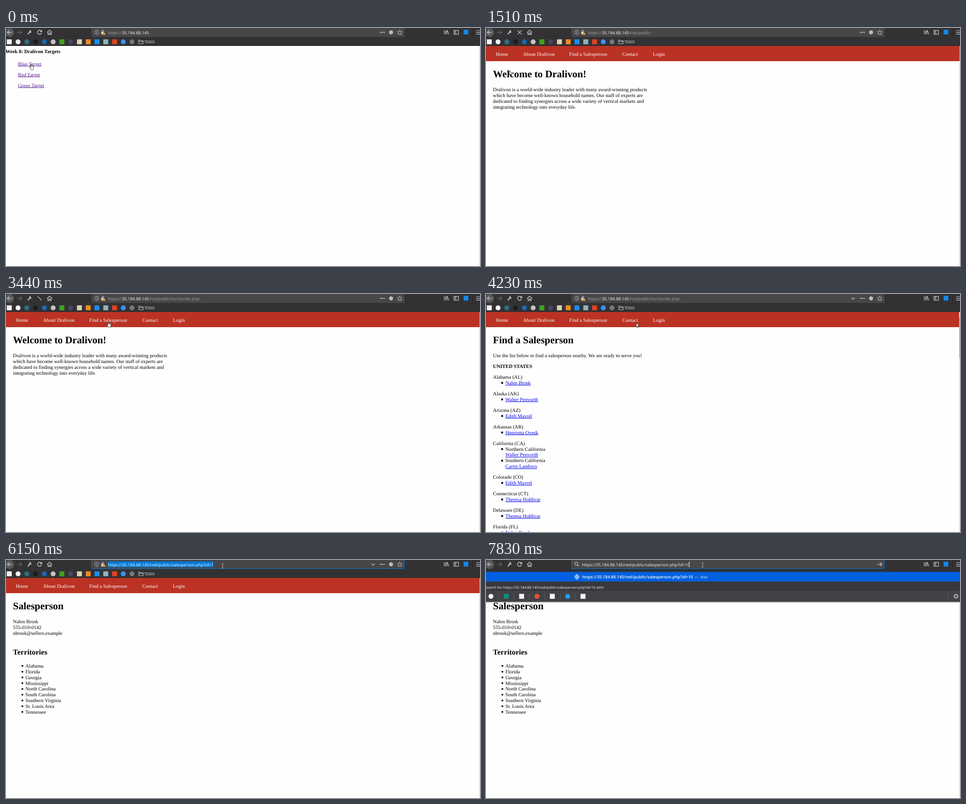
An HTML page that plays this animation: 1055x531 px, repeating every 8000 ms.

```html
<!DOCTYPE html>
<html lang="en">
<head>
<meta charset="utf-8">
<title>Browsing session</title>
<style>
  html, body { margin: 0; width: 100%; height: 100%; overflow: hidden; background: #fefefe; }
  svg { display: block; text-rendering: geometricPrecision; }
  .page { font: 11.16px "Liberation Serif", "Times New Roman", serif; }
  .ui { font: 9.2px "Open Sans", "Noto Sans", sans-serif; fill: #f9f9fa; }
  .link { text-decoration: underline; fill: #0000ee; }
  .visited { fill: #551a8b; }
  .bold { font-weight: bold; }
  .h1 { font-size: 22.25px; font-weight: bold; }
  .h2 { font-size: 16.7px; font-weight: bold; }
  .icon { fill: none; stroke: #d4d4d6; stroke-width: 1.2; }
</style>
</head>
<body>
<svg id="stage" width="1055" height="531" viewBox="0 0 1055 531"></svg>
<script>
const LOOP = 8000;
const LINE = 12.9;
const COMPANY = 'Dralivon';
const HOST = '35.184.88.145';
const PUBLIC = '/red/public/';
const AGENT = 'Nalen Brosk';

const text = (x, y, str, cls = '', extra = '') =>
  `<text x="${x}" y="${y}" class="${cls}" ${extra}>${str}</text>`;
const rect = (x, y, w, h, fill, extra = '') =>
  `<rect x="${x}" y="${y}" width="${w}" height="${h}" fill="${fill}" ${extra}/>`;
const disc = (x, y, r, fill) => `<circle cx="${x}" cy="${y}" r="${r}" fill="${fill}"/>`;
const icon = (d, extra = '') => `<path class="icon" d="${d}" ${extra}/>`;
const group = (id, content, cls = '') => `<g id="${id}" class="${cls}">${content}</g>`;

// Pages
function indexPage() {
  return text(-1, 56, `Week 8: ${COMPANY} Targets`, 'bold') +
    ['Blue', 'Red', 'Green'].map((name, i) =>
      text(26.8, 83.5 + 24 * i, name + ' Target', 'link visited', `id="link${name}"`)).join('');
}

function navBar() {
  const items = [[22, 'Home'], [82.5, 'About ' + COMPANY], [185.3, 'Find a Salesperson'],
    [303.3, 'Contact'], [371.5, 'Login']];
  return rect(0, 40, 1055, 34, '#bb3224') +
    items.map(([x, label]) => text(x, 62, label, '', 'fill="#fff"')).join('');
}

function homePage() {
  const lines = [
    `${COMPANY} is a world-wide industry leader with many award-winning products`,
    'which have become well-known household names. Our staff of experts are',
    'dedicated to finding synergies across a wide variety of vertical markets and',
    'integrating technology into everyday life.'];
  return text(15.6, 110.4, `Welcome to ${COMPANY}!`, 'h1') +
    lines.map((line, i) => text(15.6, 141 + LINE * i, line)).join('');
}

function territoriesPage() {
  const walter = 'Walter Penvorth', edith = 'Edith Mavrel', theresa = 'Theresa Holdivar';
  const states = [
    ['Alabama (AL)', AGENT], ['Alaska (AK)', walter], ['Arizona (AZ)', edith],
    ['Arkansas (AR)', 'Henrietta Ovesk'],
    ['California (CA)', walter, 'Northern California', 'Carrie Landovo', 'Southern California'],
    ['Colorado (CO)', edith], ['Connecticut (CT)', theresa], ['Delaware (DE)', theresa],
    ['Florida (FL)', AGENT]];
  let out = text(15.6, 110.4, 'Find a Salesperson', 'h1') +
    text(15.6, 141, 'Use the list below to find a salesperson nearby. We are ready to serve you!') +
    text(15.6, 165, 'UNITED STATES', 'bold');
  let y = 189;
  const bullet = () => rect(34, y - 5.5, 4, 4, '#000');
  for (const [state, ...rest] of states) {
    out += text(15.6, y, state);
    for (let i = 0; i < rest.length; i += 2) {
      y += LINE;
      out += bullet();
      if (rest[i + 1]) {
        out += text(43.3, y, rest[i + 1]);
        y += LINE;
      }
      out += text(43.3, y, rest[i], 'link');
    }
    y += LINE + 11.1;
  }
  return out + rect(1053, 40, 2, 491, '#e4e4e4') + rect(1053, 51, 2, 92, '#b5b5b5');
}

function salespersonPage() {
  const areas = ['Alabama', 'Florida', 'Georgia', 'Mississippi', 'North Carolina',
    'South Carolina', 'Southern Virginia', 'St. Louis Area', 'Tennessee'];
  return text(15.6, 110.4, 'Salesperson', 'h1') +
    [AGENT, '555-010-0142', 'nbrosk@sellers.example']
      .map((line, i) => text(15.6, 141 + LINE * i, line)).join('') +
    text(15.6, 211, 'Territories', 'h2') +
    areas.map((area, i) => disc(36.5, 236.3 + 12.85 * i, 2, '#000') +
      text(43.3, 240 + 12.85 * i, area)).join('');
}

// Browser chrome
function toolbar() {
  const bookmarks = [['#f4f4f4'], ['#f4f4f4', 1], ['#2c7184', 1], ['#1b1c1f', 1], ['#1769b5', 1],
    ['#c4c4c4', 1], ['#3fa41f'], ['#51425f', 1], ['#ddd3ad'], ['#f28a1e'], ['#168ff0'],
    ['#8fb5bd'], ['#dc4425'], ['#3f8ff5', 1], ['#77777a', 1]];
  return rect(0, 0, 1055, 40, '#323234') + rect(0, 39, 1055, 1, '#29292b') +
    disc(8, 10, 10, '#59595b') +
    icon('M13 9.7H3M7.5 5.2 3 9.7l4.5 4.5', 'stroke-width="1.5"') +
    icon('M25 9.7h10M30.5 5.2 35 9.7l-4.5 4.5', 'style="stroke:#707073"') +
    icon('M48.3 14 53 9.3', 'style="stroke-width:2"') +
    icon('M55.5 5.2A2.5 2.5 0 1 0 57 8.2l-2 .4-1.2-1.2z', 'style="fill:#d4d4d6;stroke-width:.5"') +
    icon('M91.5 10 97 4.7l5.5 5.3M93.3 9.5v5.2h2.5v-3.5h2.4v3.5h2.5V9.5') +
    icon('M975.5 5v9M978.5 5v9M981.3 5v9M982 5l3.5 9') +
    icon('M997 5.3h10v8.6h-10zM1000.8 5.3v8.6M998.3 7.8h1.2M998.3 10h1.2') +
    rect(1018.5, 4, 10.5, 10.5, '#1389e9', 'rx="1.5"') +
    rect(1038, 0, 1, 21, '#202022') +
    icon('M1046.5 6h9M1046.5 9.8h9M1046.5 13.6h9') +
    bookmarks.map(([fill, round], i) => {
      const x = 7.3 + 19.52 * i;
      return round ? disc(x, 30.8, 5.5, fill) : rect(x - 5.5, 25.3, 11, 11, fill);
    }).join('') +
    icon('M295.2 35V27h3.8l1.4 1.6h5V35zM295.2 30h10', 'style="stroke-width:1"') +
    text(308, 34, 'TODO', '', 'style="font-size:8.2px"');
}

function identityIcons() {
  return `<circle class="icon" cx="202" cy="9.7" r="4.6" style="stroke-width:.9"/>` +
    icon('M202 8.8v3.4M202 6.8v1.1', 'style="stroke-width:1"') +
    rect(212, 8.5, 7, 5.8, '#d4d4d6') + icon('M213.5 9V7a2 2 0 0 1 4 0v2') +
    '<path d="M218.2 8.5l3.9 6.5h-7.8z" fill="#ffbf1f" stroke="#474749" stroke-width=".5"/>' +
    rect(217.9, 10.8, .7, 2, '#333');
}

function pageActions() {
  return [833.5, 837.5, 841.5].map(x => disc(x, 9.8, 1.3, '#d4d4d6')).join('') +
    disc(857, 9.8, 4.5, '#bcbcbe') +
    icon('M876.5 4.5l1.6 3.5 3.8.4-2.8 2.6.8 3.8-3.4-1.9-3.4 1.9.8-3.8-2.8-2.6 3.8-.4z',
      'style="stroke-width:1"');
}

function suggestions() {
  const url = `https://${HOST}${PUBLIC}salesperson.php?id=10`;
  const engines = [['#f5f5f5', 1], ['#12897f'], ['#f5f5f5'], ['#de5833', 1], ['#f5f5f5'],
    ['#1da1f2', 1], ['#f5f5f5']];
  return rect(0, 20, 1055, 7, '#303032') + rect(0, 26.5, 1055, 22, '#0060df') +
    rect(0, 48, 1055, 22, '#38383b') + rect(0, 70, 1055, 24, '#424246') +
    rect(0, 69.5, 1055, 1, '#4c4c50') + rect(0, 93, 1055, 1.5, '#8a8a8c') +
    icon('M197.3 37.7a5 5 0 1 0 10 0a5 5 0 1 0-10 0h10M202.3 32.7v10M202.3 32.7q-5 5 0 10q5-5 0-10',
      'style="stroke:#fff;stroke-width:.9"') +
    text(214, 41.3, url, '', 'font-weight="600"') +
    text(464.5, 41.3, '—', '', 'style="font-size:8.5px"') +
    text(477, 41.3, 'Visit', '', 'style="font-size:8.2px"') +
    text(-1.3, 63.5, `Search for ${url} with:`, '', 'style="font-size:7.87px"') +
    engines.map(([fill, round], i) => {
      const x = 11 + 34.15 * i;
      return (round ? disc(x, 81, 5.5, fill) : rect(x - 5.5, 75.5, 11, 11, fill)) +
        (i < 6 ? rect(x + 17, 74, .8, 14, '#66666a') : '');
    }).join('') +
    rect(1028, 74, .8, 14, '#66666a') +
    '<circle class="icon" cx="1046" cy="81" r="3.1"/>' +
    '<circle class="icon" cx="1046" cy="81" r="4.8" style="stroke-dasharray:1.9;stroke-width:1.5"/>';
}

const pages = { index: indexPage, home: homePage, territories: territoriesPage, salesperson: salespersonPage };
const reloadShapes = {
  reload: icon('M78.6 7.2A4.5 4.5 0 1 0 79 11M79.5 4.5v3.7h-3.7', 'style="stroke-width:1.4"'),
  start: icon('M72 6.5l4 4'),
  slash: icon('M70.5 5.2l8.8 8.8'),
  stop: icon('M70.2 5l9.4 9.4M79.6 5l-9.4 9.4'),
  dim: icon('M70.2 5l9.4 9.4M79.6 5l-9.4 9.4', 'style="stroke:#77777a"')
};
const beam = color =>
  `<path d="M-2-5h1.4L0-4.4.6-5H2M-2 5h1.4L0 4.4.6 5H2M0-4.4v8.8" fill="none" stroke="${color}" stroke-width=".9"/>`;
const pointer = d => `<path d="${d}" fill="#fff" stroke="#000" stroke-width=".75"/>`;
const cursors = {
  arrow: pointer('M.4.4V9.8L2.6 7.8 4 11l1.6-.7L4.2 7.3H7.1z'),
  hand: pointer('M3.2 8.2V1.3Q3.2.4 4 .4t.9.9V5Q5.7 4.2 6.4 5.2 7.2 4.6 7.9 5.6 9.6 5.2 9.6 7V9.5L8.5 13H3.9L.7 8.4Q.4 7.3 1.4 7.2z'),
  beam: beam('#777'),
  lightBeam: beam('#ccc')
};
const choices = (prefix, shapes) =>
  Object.entries(shapes).map(([name, shape]) => group(prefix + name, shape)).join('');

document.getElementById('stage').innerHTML =
  rect(0, 0, 1055, 531, '#fefefe') +
  group('pages', group('nav', navBar()) +
    Object.entries(pages).map(([name, build]) => group('page-' + name, build())).join('') +
    rect(1054, 40, 1, 491, '#c9c9c9', 'id="edge"'), 'page') +
  group('chrome', toolbar() + choices('reload-', reloadShapes) +
    rect(190.5, -2, 696, 21.5, '#474749', 'id="field"') +
    group('identity', identityIcons()) + group('actions', pageActions()) +
    icon('M813.3 8l3.8 4 3.8-4', 'id="chevron"') +
    group('typing', icon('M204 11l3.4 3.4M197.3 8.2a3.6 3.6 0 1 0 7.2 0a3.6 3.6 0 1 0-7.2 0') +
      icon('M871 9.7h10.3M877 5.5l4.3 4.2-4.3 4.2')) +
    rect(227, 3, 234.5, 13, '#0078d7', 'id="selection"') +
    '<text id="url" y="13.8"></text>' +
    rect(461, 3, 1, 13, '#f9f9fa', 'id="caret"') +
    group('dropdown', suggestions()), 'ui') +
  group('cursor', choices('cursor-', cursors));

// Timeline: each value holds until the next entry
const tracks = {
  page: [[0, 'index'], [1510, 'home'], [3570, 'territories'], [5330, 'salesperson']],
  path: [[0, ''], [1360, PUBLIC], [3440, PUBLIC + 'territories.php'],
    [5210, PUBLIC + 'salesperson.php?id=1'], [7830, PUBLIC + 'salesperson.php?id=10']],
  reload: [[0, 'reload'], [1210, 'start'], [1360, 'slash'], [1510, 'stop'], [1660, 'dim'],
    [2070, 'reload'], [3290, 'start'], [3440, 'slash'], [3570, 'stop'], [3830, 'dim'],
    [4080, 'reload'], [5210, 'slash'], [5330, 'dim'], [6030, 'reload']],
  cursor: [[0, 'hand', 52, 80], [500, 'hand', 52, 84.5], [800, 'hand', 49, 100.5],
    [1360, 'beam', 53.7, 102], [1510, 'arrow', 52, 95], [1660, 'arrow', 64, 92],
    [1790, 'arrow', 95, 79], [1940, 'arrow', 160, 68], [2070, 'arrow', 221, 61],
    [2210, 'hand', 225, 66], [2330, 'hand', 224, 61], [3570, 'arrow', 853, 33],
    [3830, 'lightBeam', 690, 10], [3960, 'lightBeam', 540, 10], [4080, 'lightBeam', 410, 12],
    [4230, 'arrow', 334, 64], [4350, 'arrow', 195, 130], [4480, 'arrow', 85, 190],
    [4630, 'hand', 62, 203], [4780, 'hand', 63, 203], [4910, 'hand', 64, 203],
    [5330, 'arrow', 434, 75], [5480, 'arrow', 472, 36], [5750, 'lightBeam', 482, 14],
    [5880, 'lightBeam', 482, 13], [6860, 'lightBeam', 482, 12.5], [7100, 'lightBeam', 482, 12],
    [7250, 'lightBeam', 482, 11]]
};
const at = (track, t) => track.findLast(([start]) => start <= t).slice(1);
const within = (t, from, to = LOOP) => t >= from && t < to;
const el = id => document.getElementById(id);
const show = (id, on) => { el(id).style.display = on ? '' : 'none'; };
const pick = (prefix, shapes, current) =>
  Object.keys(shapes).forEach(name => show(prefix + name, name === current));

let lastUrl = '';
function setUrl(path, focused, typing) {
  const shade = focused ? '#f9f9fa' : '#a5a5a8';
  const markup = `<tspan fill="${shade}">https://</tspan><tspan>${HOST}</tspan><tspan fill="${shade}">${path}</tspan>`;
  if (markup !== lastUrl) el('url').innerHTML = lastUrl = markup;
  el('url').setAttribute('x', typing ? 213.5 : 227);
}

function update(t) {
  const [page] = at(tracks.page, t);
  const [shape, x, y] = at(tracks.cursor, t);
  const focused = t >= 6030;
  const typing = t >= 7830;

  pick('page-', pages, page);
  show('nav', page !== 'index');
  show('edge', page !== 'territories');
  el('linkRed').style.fill = within(t, 1060, 1210) ? '#ee0000' : '';

  pick('reload-', reloadShapes, at(tracks.reload, t)[0]);
  setUrl(at(tracks.path, t)[0], focused, typing);
  el('field').setAttribute('stroke', focused ? '#0a78d4' : '#474749');
  show('identity', !typing);
  show('actions', !typing);
  show('chevron', within(t, 3830, 4480) || within(t, 5750, 7830));
  show('typing', typing);
  show('dropdown', typing);
  show('selection', within(t, 6030, 6710));
  show('caret', within(t, 6710, 7100) || t >= 7680);
  el('caret').setAttribute('x', typing ? 452 : 461);

  pick('cursor-', cursors, shape);
  el('cursor').setAttribute('transform', `translate(${x} ${y})`);
}

const began = performance.now();
function tick() {
  update((performance.now() - began) % LOOP);
  requestAnimationFrame(tick);
}
tick();
</script>
</body>
</html>
```
